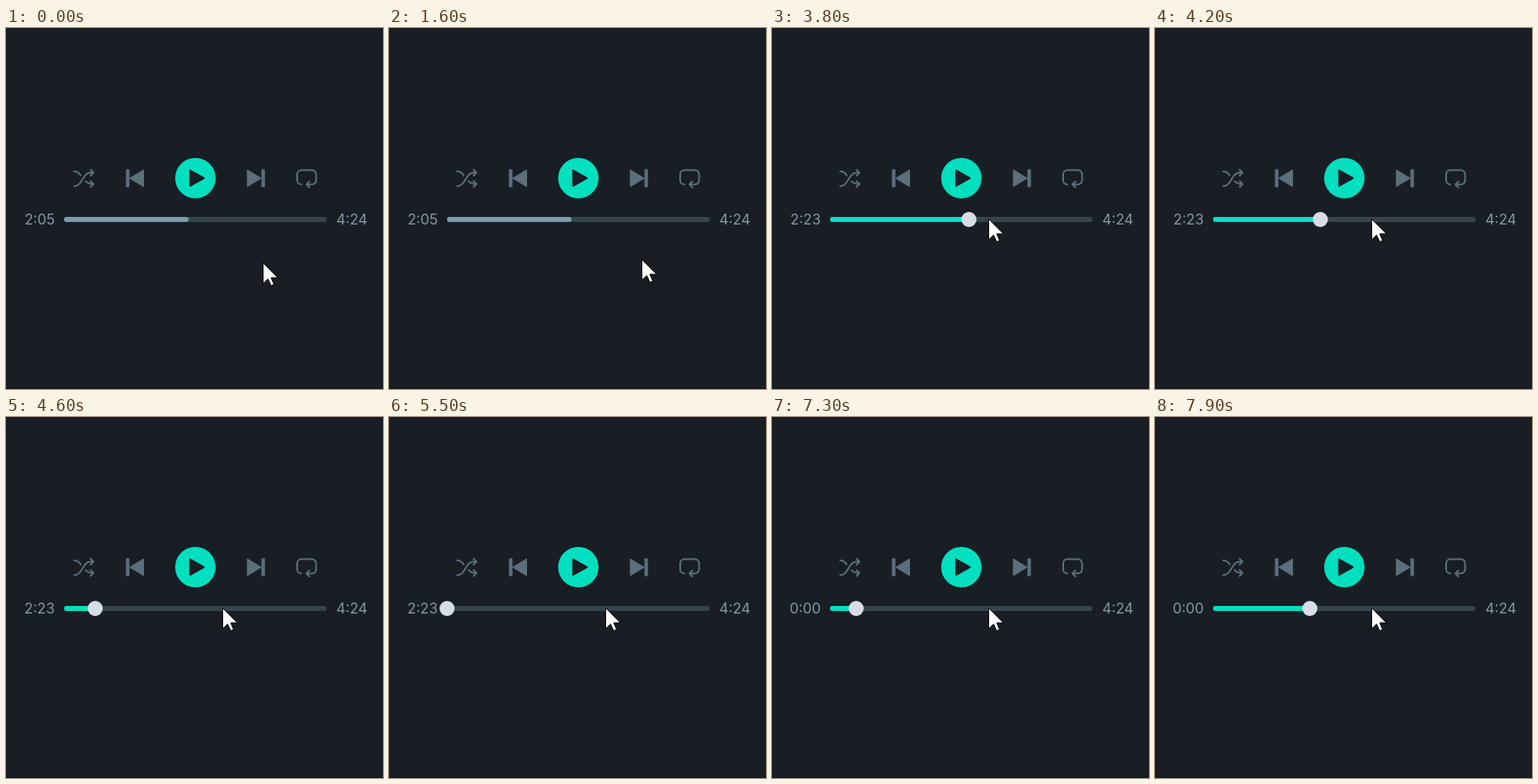
An HTML page that plays this animation: 448 by 428 pixels, repeating every 8 s.

```html
<!DOCTYPE html>
<html lang="en">
<head>
<meta charset="utf-8">
<title>Player seek bar</title>
<style>
  html, body { margin: 0; width: 100%; height: 100%; overflow: hidden; background: #181e24; }
  svg { display: block; width: 448px; height: 428px; }
  text { font: 400 17px Inter, "Liberation Sans", sans-serif; fill: #8797a7; }
  .line { fill: none; stroke: #5b6f7d; stroke-width: 2; stroke-linecap: round; stroke-linejoin: round; }
  .solid { fill: #5b6f7d; stroke: #5b6f7d; stroke-width: 1.4; stroke-linejoin: round; }
</style>
</head>
<body>
<svg viewBox="0 0 448 428">
  <rect width="448" height="428" fill="#181e24"/>
  <rect y="427" width="448" height="1" fill="#12171c"/>

  <g class="line">
    <path d="M81 187.5C91 187.5 91 171.5 100 171.5H104M100.5 168L104 171.5L100.5 175"/>
    <path d="M81 170C85 170 87 172 88.7 174.6M94.5 181.5C96.5 184 99 185 104 185M100.5 181.5L104 185L100.5 188.5"/>
    <path d="M351 185.5a5 5 0 0 1-5-5V173.500a5 5 0 0 1 5-5H363.500a5 5 0 0 1 5 5V180.500a5 5 0 0 1-5 5H357M360.500 182L357 185.500L360.500 189"/>
  </g>

  <g class="solid">
    <path d="M143.200 168.200H146V188H143.200ZM163.300 168.500V187.700L147.500 178.100Z"/>
    <path d="M304.200 168.200H307V188H304.200ZM287 168.500V187.700L302.700 178.100Z"/>
  </g>

  <circle cx="225" cy="178" r="24" fill="#00e0c0"/>
  <path d="M218.500 168.500V187.500L235.500 178Z" fill="#181e24" stroke="#181e24" stroke-width="1.500" stroke-linejoin="round"/>

  <rect x="69" y="224" width="312" height="6" rx="3" fill="#36444e"/>
  <rect id="fill" x="69" y="224" height="6" rx="3"/>
  <circle id="knob" cy="227" r="9" fill="#d7dde6"/>

  <text id="elapsed" x="58" y="233" text-anchor="end"></text>
  <text x="392.500" y="233">4:24</text>

  <path id="cursor" d="M0 0V24.500L5.800 19L9.500 27L13 25.500L9.500 17.500H17.500Z" fill="#fff" stroke="#000" stroke-width="1"/>
</svg>

<script>
const LOOP = 8000, STEP = 100, START = 69;
const HOVER = 1800;
const $ = id => document.getElementById(id);
const fill = $('fill'), knob = $('knob'), elapsed = $('elapsed'), cursor = $('cursor');

// [time, value] tables
const seek = [
  [0, 217], [2400, 217], [2500, 228], [2600, 232], [3000, 239], [3200, 239],
  [3800, 234], [4100, 213], [4600, 106], [5000, 86], [5500, 69],
  [6800, 69], [7300, 100], [7700, 163], [7900, 184]
];
const labels = [[0, '2:05'], [3300, '2:23'], [6700, '0:00']];
const pointer = [[0, [305, 278]], [100, [302, 276]], [200, [300, 274]], [HOVER, [257, 226]]];

const held = (table, t) => table.filter(([time]) => time <= t).pop()[1];

// Monotone cubic through the table
const rate = i => (seek[i + 1][1] - seek[i][1]) / (seek[i + 1][0] - seek[i][0]);
function slope(i) {
  if (i === 0 || i === seek.length - 1) return rate(i ? i - 1 : 0);
  const a = rate(i - 1), b = rate(i);
  return a * b > 0 ? 2 * a * b / (a + b) : 0;
}
function smooth(t) {
  const i = seek.findIndex(([time]) => time > t) - 1;
  if (i < 0) return seek[seek.length - 1][1];
  const [t0, v0] = seek[i], [t1, v1] = seek[i + 1];
  const d = t1 - t0, u = (t - t0) / d, w = 1 - u;
  return v0 * (1 + 2 * u) * w * w + v1 * u * u * (3 - 2 * u)
       + d * u * w * (slope(i) * w - slope(i + 1) * u);
}

function draw(now) {
  const t = Math.floor((now % LOOP) / STEP) * STEP;
  const x = smooth(t), active = t >= HOVER;
  fill.setAttribute('width', Math.max(0, x - START));
  fill.setAttribute('fill', active ? '#00e0c0' : '#8299ac');
  knob.setAttribute('cx', x);
  knob.setAttribute('visibility', active ? 'visible' : 'hidden');
  elapsed.textContent = held(labels, t);
  cursor.setAttribute('transform', `translate(${held(pointer, t).map(v => v + 0.5)})`);
}

const begin = performance.now();
function tick() {
  draw(performance.now() - begin);
  requestAnimationFrame(tick);
}
tick();
</script>
</body>
</html>
```
